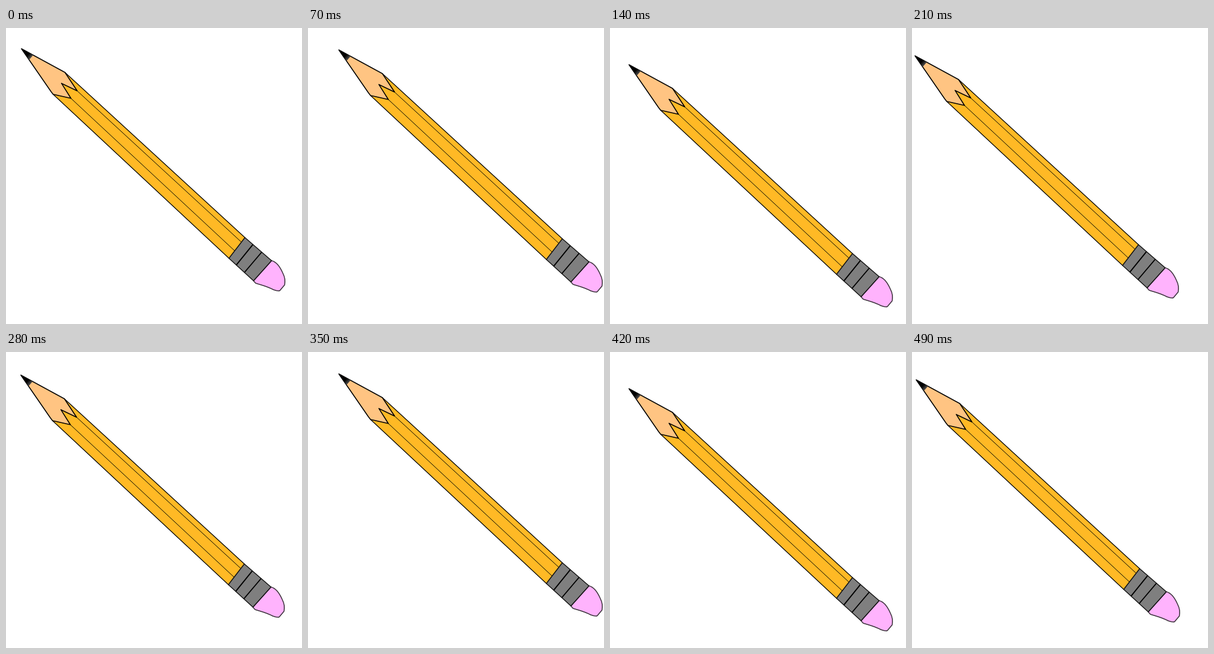
Recreate the animation shown at these times as an HTML page with a canvas. Size 500 by 500 pixels, loop 560 ms.

```html
<!DOCTYPE html>
<html lang="en">
<head>
<meta charset="utf-8">
<title>Shaking pencil</title>
<style>
html, body { margin: 0; width: 100%; height: 100%; overflow: hidden; background: #fff; }
canvas { display: block; width: 500px; height: 500px; }
</style>
</head>
<body>
<canvas id="stage" width="500" height="500"></canvas>
<script>
const ctx = document.getElementById('stage').getContext('2d');
const STEP = 70;

// Two rounds of the same four-corner shake, the second slightly off
const jumps = [[0, 0], [26, 2], [6, 27], [-21, 12], [-1, 4], [26, 2], [6, 27], [-19, 12]];

const mix = (a, b, t) => a.map((v, i) => v + (b[i] - v) * t);

// Maps u (along) and v (across) into a four-cornered part
const part = (a, b, c, d) => (u, v) => mix(mix(a, b, u), mix(d, c, u), v);

function path(points, close) {
  const p = new Path2D();
  points.forEach(([x, y]) => p.lineTo(x, y));
  if (close) p.closePath();
  return p;
}

const outline = at => path([at(0, 0), at(1, 0), at(1, 1), at(0, 1)], true);

const tip = [26.5, 35];
const shaft = part([100, 75], [404, 354], [377, 389], [80, 112]);
const metal = part(shaft(1, 0), [449, 393], [418.5, 427], shaft(1, 1));

// The cut where paint meets wood, and the two ridges that start at it
const cut = [shaft(0, 0), shaft(0.083, 0.22), shaft(0.009, 0.43), shaft(0.075, 0.62), shaft(0, 1)];
const ridges = [path([cut[1], shaft(1, 0.22)]), path([cut[3], shaft(1, 0.64)])];
const sides = [0, 1].map(v => path([shaft(0, v), shaft(1, v)]));

const heel = [76.5, 107.5];
const wood = path([tip, ...cut, heel], true);
const lead = path([tip, mix(tip, cut[0], 0.27), mix(tip, heel, 0.26)], true);
const bands = [0.3, 0.63].map(u => path([metal(u, 0.02), metal(u, 0.98)]));

const eraser = new Path2D(
  'M449 393 C458 395 464 405 468 414 C472 422 472 427 471 434 ' +
  'L463 443.5 Q460 445 452 442 C441 436 431 434 422 431 L418.5 427 Z');

function fill(shape, color) {
  ctx.fillStyle = color;
  ctx.fill(shape);
}

function line(shape, width, color = '#000') {
  ctx.lineWidth = width;
  ctx.strokeStyle = color;
  ctx.stroke(shape);
}

function drawPencil() {
  fill(outline(shaft), '#ffb925');
  ridges.forEach(ridge => line(ridge, 1));
  sides.forEach(side => line(side, 1.2));

  fill(wood, '#ffc482');
  line(wood, 1.6);
  const shade = ctx.createLinearGradient(...tip, 43, 51);
  shade.addColorStop(0.65, '#000');
  shade.addColorStop(1, '#555');
  fill(lead, shade);

  fill(eraser, '#ffb3fd');
  line(eraser, 1.6, '#3d333d');
  fill(outline(metal), '#7f7f7f');
  line(outline(metal), 1.5, '#111');
  bands.forEach(band => line(band, 1.9));
}

function render(now) {
  const [dx, dy] = jumps[Math.floor(now / STEP) % jumps.length];
  ctx.setTransform(1, 0, 0, 1, 0, 0);
  ctx.fillStyle = '#fff';
  ctx.fillRect(0, 0, 500, 500);
  ctx.translate(dx - 0.4, dy);
  ctx.lineJoin = ctx.lineCap = 'round';
  drawPencil();
}

let start;
function tick(now) {
  start ??= now;
  render(Math.max(0, now - start));
  requestAnimationFrame(tick);
}
render(0);
requestAnimationFrame(tick);
</script>
</body>
</html>
```
